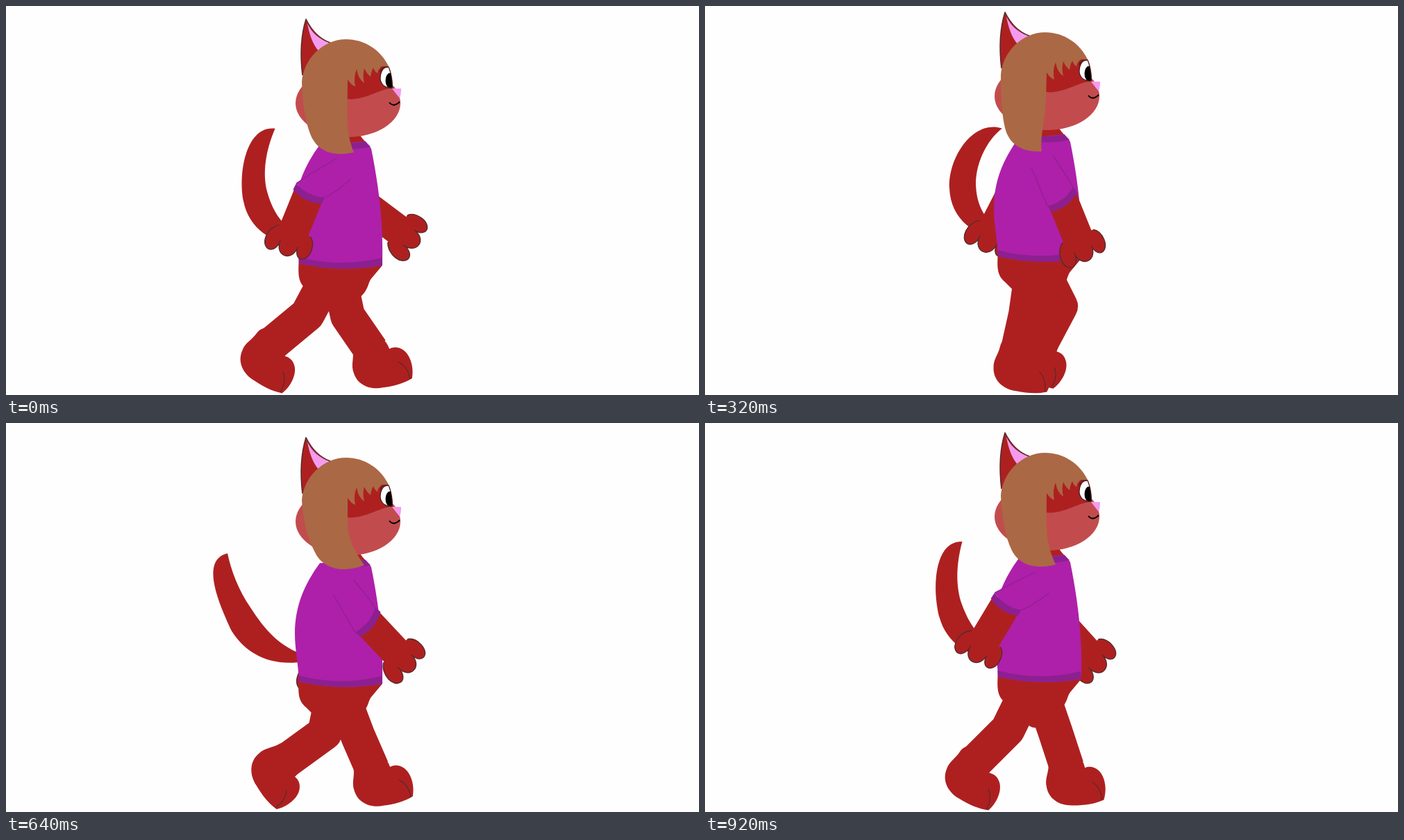
Animation of 998x561 px, one loop 0.96 s. Source, as an HTML page with a canvas:

```html
<!DOCTYPE html>
<html lang="en">
<head>
<meta charset="utf-8">
<title>Walk cycle</title>
<style>
html, body { margin: 0; width: 100%; height: 100%; overflow: hidden; background: #fefefe; }
canvas { display: block; width: 998px; height: 561px; }
</style>
</head>
<body>
<canvas id="stage"></canvas>
<script>
const W = 998, H = 561, LOOP = 960, STEP = 40;
const RED = '#ae2020', LIGHT = '#c24c4d', HAIR = '#ab6845', PINK = '#f49bf0';
const SHIRT = '#ae20a9', TRIM = '#8c2090', LINE = '#5a2a2c';

const canvas = document.getElementById('stage');
const ctx = canvas.getContext('2d');
const dpr = window.devicePixelRatio || 1;
canvas.width = W * dpr;
canvas.height = H * dpr;

// Pose keys in ms; every track below has one value per key.
const times = [0, 120, 240, 320, 400, 520, 640, 720, 800, 920];

const body = {
  bob:  [0, 7, -5, -10, -6, 5, 2, -15, -14, -5],
  tail: [.586, .83, 1, .93, .76, .45, 0, -.3, 0, .44],
  hair: [.385, .67, 1, .8, .56, .25, 0, -.08, .03, .28]
};
const near = {
  ankleX: [526, 524, 480, 450, 414, 390, 404, 440, 481, 521],
  ankleY: [496.5, 500, 501, 499, 491, 489, 487, 478, 475, 496],
  foot:   [-11, 0, 0, 8, 25, 36, 56, 52, 38, -4],
  kneeX:  [492, 512, 478, 462, 445, 442, 459, 480, 502, 505],
  kneeY:  [447, 452, 445, 445, 448, 447, 447, 440, 435, 447],
  upper:  [-54.5, -68, 8, 28, 38, 62, 35, 0, -37, -59],
  fore:   [-22, -57, 7, 22, 36, 62, 43, 20, -5, -31]
};
const far = {
  ankleX: [381, 390, 470, 486, 502, 533, 527, 490, 442, 388],
  ankleY: [489, 491, 480, 482, 489, 492, 498, 501, 503, 490],
  foot:   [31, 57, 45, 32, 15, -14, -11, 0, 16, 28],
  kneeX:  [434, 460, 508, 512, 511, 506, 507, 485, 460, 436],
  kneeY:  [445, 447, 432, 433, 438, 446, 452, 448, 450, 442],
  upper:  [31, 36, -24, -45, -53, -62, -17, 0, 14, 23],
  fore:   [53, 68, -22, -27, -31, -55, -11, 2, 15, 42]
};

// Periodic monotone cubic through the keys.
function sample(v, t) {
  const n = times.length, at = i => v[(i + n) % n];
  const span = i => {
    const k = (i + n) % n;
    return (k === n - 1 ? LOOP : times[k + 1]) - times[k];
  };
  const rise = i => (at(i + 1) - at(i)) / span(i);
  const slope = i => {
    const a = rise(i - 1), b = rise(i);
    return a * b <= 0 ? 0 : 2 * a * b / (a + b);
  };
  let i = n - 1;
  while (times[i] > t) i--;
  const d = span(i), u = (t - times[i]) / d, w = 1 - u;
  return w * w * (1 + 2 * u) * at(i) + u * w * w * d * slope(i)
    + u * u * (3 - 2 * u) * at(i + 1) - u * u * w * d * slope(i + 1);
}

function pose(tracks, t) {
  const p = {};
  for (const k in tracks) p[k] = sample(tracks[k], t);
  return p;
}

function fill(path, color) {
  ctx.fillStyle = color;
  ctx.fill(path);
}

function stroke(path, color, width) {
  ctx.strokeStyle = color;
  ctx.lineWidth = width;
  ctx.stroke(path);
}

function placed(x, y, deg, draw) {
  ctx.save();
  ctx.translate(x, y);
  ctx.rotate(deg * Math.PI / 180);
  draw();
  ctx.restore();
}

// Unit vector for a limb angle: 0 hangs down, positive swings forward.
function dir(deg) {
  const a = deg * Math.PI / 180;
  return [Math.sin(a), Math.cos(a)];
}

const shapes = {
  foot: 'M-26,-4C-27,8-33,15-31,27C-29,46-12,56 6,56C22,57 36,56 50,51C56,36 54,17 45,8C39,2 32,1 26,3C22,-30-24,-30-26,-4Z',
  toe: 'M35,24C42,29 47,38 47,51',
  palm: 'M-23,-8C-38,2-38,28-24,30C-16,30-12,20-13,12C-13,36 14,36 14,12C15,32 34,30 34,10C34,0 30,-6 25,-9',
  pelvis: 'M422,360C421,385 419,397 432,408L462,438Q475,450 488,440L511,419C523,408 521,398 527,392L542,374V360Z',
  shirt: 'M452,200C430,230 416,262 416,302C416,325 421,345 422,371Q480,385 542,374C543,330 541,280 526,206Q524,202 517,195L489,198Z',
  hem: 'M421.5,362Q482,378 541,363L542,374Q480,385 422,371Z',
  neck: 'M480,178L509,184Q512,191 520,198L480,200Z',
  collar: 'M476,197L489,198Q505,198 517,195L525,203Q508,207 489,206.5L476,206Z',
  ear: 'M427,100C424,75 424,45 432,19C440,35 450,47 467,53',
  innerEar: 'M434,25C437,42 442,55 450,65L466,53C450,48 440,38 434,25Z',
  brow: 'M440,134H490C515,137 532,122 557,118C557,105 555,95 551,87L490,60L440,100Z',
  nose: 'M556,119H569Q569,128 567,133Q562,127 556,119Z',
  eye: 'M551,88C542,87 539,97 539,105C540,113 546,119 556.5,118C556,108 555,97 551,88Z',
  lid: 'M539,95Q541,88 550,87.5',
  mouth: 'M552,139Q558,147 567,138'
};
for (const k in shapes) shapes[k] = new Path2D(shapes[k]);

const head = new Path2D();
head.ellipse(492.5, 140, 75.5, 49, 0, 0, 7);
const pupil = new Path2D();
pupil.ellipse(553, 107.5, 6.5, 11, 0, 0, 7);

// Smooth outline from a flat point list: a start, then cubic triples.
function curve(a, b, k) {
  const p = a.map((v, i) => v + (b[i] - v) * k);
  let d = `M${p[0]},${p[1]}`;
  for (let i = 2; i < p.length; i += 6) d += 'C' + p.slice(i, i + 6).join(' ');
  return d;
}

const tailBack = [430, 342, 380, 350, 345, 330, 325, 298, 305, 255, 280, 195, 319, 186,
  324, 210, 335, 240, 352, 264, 375, 300, 395, 320, 430, 333];
const tailUp = [430, 344, 395, 345, 354, 320, 354, 270, 354, 225, 395, 175, 436, 190,
  410, 205, 393, 240, 393, 270, 393, 305, 410, 325, 430, 333];
const hairFront = [426, 110, 429, 150, 437, 170, 448, 190, 460, 208, 485, 215, 516, 203,
  500, 180, 492, 165, 492, 140];
const hairBack = [426, 110, 425, 140, 426, 185, 433, 198, 440, 214, 455, 222, 477, 224,
  478, 200, 490, 175, 491, 140];
const fringe = 'L492,106Q497,114 503,116Q500,103 505,91Q507,105 516,111Q513,100 516,90'
  + 'Q519,97 525,102Q526,94 529,89Q531,95 535,97Q536,91 541,87L551,87'
  + 'C540,64 517,48 490,48C455,48 428,78 426,110Z';

function drawTail(k) {
  // The tip rides an arc rather than a straight line.
  const lift = 48 * k * (1 - k);
  const arc = p => p.map((v, i) => i === 11 || i === 13 ? v - lift : v);
  fill(new Path2D(curve(arc(tailBack), arc(tailUp), k) + 'Z'), RED);
}

function drawLeg(p, bob) {
  const hipX = 475 + .35 * (p.kneeX - 475);
  const leg = new Path2D(`M${hipX},${395 + bob}L${p.kneeX},${p.kneeY}L${p.ankleX},${p.ankleY}`);
  stroke(leg, RED, 50);
  placed(p.ankleX, p.ankleY, p.foot, () => {
    fill(shapes.foot, RED);
    stroke(shapes.toe, LINE, 1.3);
  });
}

function drawArm(p, sleeved) {
  const u = dir(p.upper), f = dir(p.fore);
  const sx = 486, sy = 235;
  const ex = sx + 61 * u[0], ey = sy + 61 * u[1];
  const hx = ex + 66 * f[0], hy = ey + 66 * f[1];

  stroke(new Path2D(`M${sleeved ? ex : sx},${sleeved ? ey : sy}L${ex},${ey}L${hx - 6 * f[0]},${hy - 6 * f[1]}`), RED, 44);
  placed(hx, hy, -p.fore, () => {
    fill(shapes.palm, RED);
    stroke(shapes.palm, LINE, 1.4);
  });
  if (!sleeved) return;

  const c = dir((p.upper + p.fore) / 2 + 12);
  // Points on the sleeve: side is -1 for the back edge, 1 for the front.
  const top = side => [sx + side * 18 * u[1], sy - side * 18 * u[0]];
  const bend = side => [top(side)[0] + 32 * u[0] + side * 3 * u[1], top(side)[1] + 32 * u[1] - side * 3 * u[0]];
  const cuff = (side, drop) => [ex + side * 23 * c[1] + drop * c[0], ey - side * 23 * c[0] + drop * c[1]];
  const sag = drop => [ex + drop * c[0], ey + drop * c[1]];
  const edge = side => `M${top(side)}Q${bend(side)} ${cuff(side, -5)}`;

  fill(new Path2D(`${edge(-1)}Q${sag(5)} ${cuff(1, -5)}Q${bend(1)} ${top(1)}Z`), SHIRT);
  fill(new Path2D(`M${cuff(-1, -5)}Q${sag(5)} ${cuff(1, -5)}L${cuff(1, 5)}Q${sag(15)} ${cuff(-1, 5)}Z`), TRIM);
  for (const side of [-1, 1]) stroke(new Path2D(edge(side)), TRIM, 1.2);
}

function drawTorso() {
  fill(shapes.neck, RED);
  fill(shapes.shirt, SHIRT);
  fill(shapes.hem, TRIM);
  fill(shapes.collar, TRIM);
}

function drawHead(swing) {
  const ear = new Path2D(shapes.ear);
  ear.lineTo(450, 66);
  fill(ear, RED);
  fill(shapes.innerEar, PINK);
  stroke(shapes.ear, LINE, 1.6);
  fill(head, LIGHT);
  fill(shapes.brow, RED);
  fill(shapes.eye, '#fff');
  ctx.save();
  ctx.clip(shapes.eye);
  fill(pupil, '#000');
  ctx.restore();
  stroke(shapes.eye, '#3d1618', 1.1);
  stroke(shapes.lid, '#6a1c1c', 2.5);
  fill(shapes.nose, PINK);
  stroke(shapes.mouth, '#000', 1.8);
  fill(new Path2D(curve(hairFront, hairBack, swing) + fringe), HAIR);
}

function draw(t) {
  const b = pose(body, t), n = pose(near, t), f = pose(far, t);
  const onBody = fn => placed(0, b.bob, 0, fn);

  ctx.setTransform(dpr, 0, 0, dpr, 0, 0);
  ctx.fillStyle = '#fefefe';
  ctx.fillRect(0, 0, W, H);
  ctx.lineJoin = 'round';

  onBody(() => {
    drawTail(b.tail);
    drawArm(f, false);
  });
  drawLeg(f, b.bob);
  drawLeg(n, b.bob);
  onBody(() => {
    fill(shapes.pelvis, RED);
    drawTorso();
    drawArm(n, true);
    drawHead(b.hair);
  });
}

const start = performance.now();
function tick() {
  const t = Math.max(0, performance.now() - start) % LOOP;
  draw(Math.floor(t / STEP) * STEP);
  requestAnimationFrame(tick);
}
tick();
</script>
</body>
</html>
```
